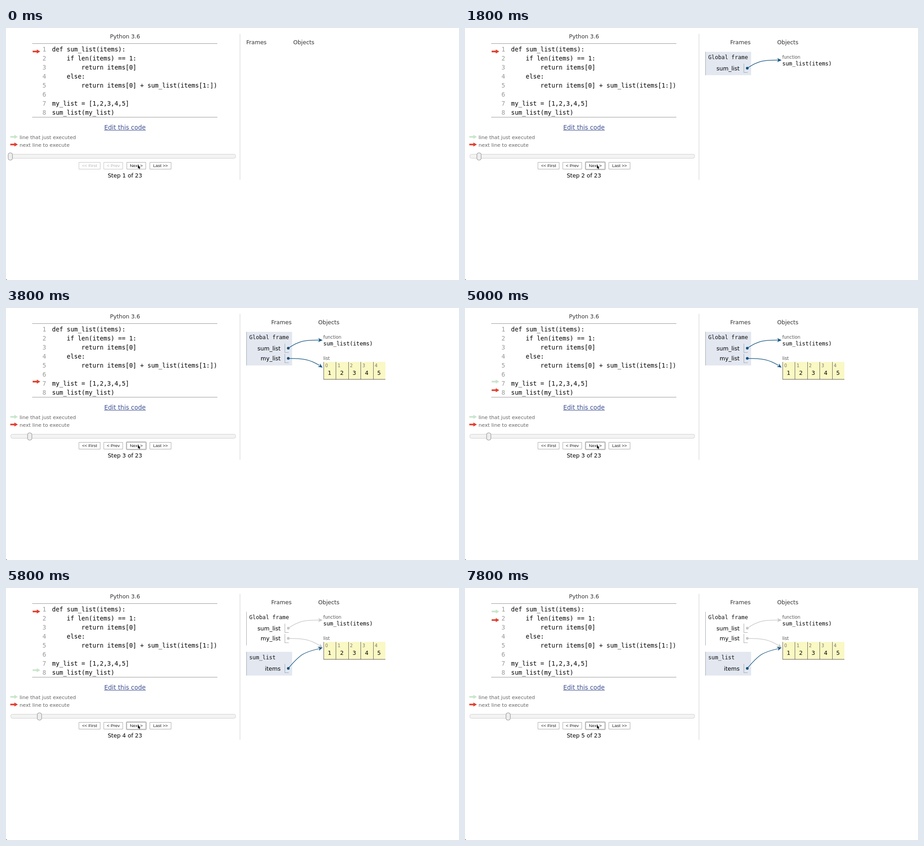
Recreate the animation shown at these times as an HTML page with a canvas. Size 1003 px wide and 558 px high, loop 8000 ms.

```html
<!DOCTYPE html>
<html lang="en">
<head>
<meta charset="utf-8">
<title>Recursive sum, step by step</title>
<style>
html, body { margin: 0; width: 100%; height: 100%; overflow: hidden; background: #fff; }
canvas { display: block; }
</style>
</head>
<body>
<canvas id="stage" width="1003" height="558"></canvas>
<script>
const ctx = document.getElementById('stage').getContext('2d');
const SANS = '"DejaVu Sans", sans-serif';
const MONO = '"DejaVu Sans Mono", monospace';
const ARIAL = '"Liberation Sans", sans-serif';
const LOOP = 8000, TICK = 200;
const RED = '#e0402f', GREEN = '#c8e5ca', BLUE = '#11527f', FADED = '#c6c6c6';

const CODE = [
  'def sum_list(items):',
  '    if len(items) == 1:',
  '        return items[0]',
  '    else:',
  '        return items[0] + sum_list(items[1:])',
  '',
  'my_list = [1,2,3,4,5]',
  'sum_list(my_list)'
];
const STEP_TIMES = [1800, 3800, 5400, 7400];
const PRESSES = [[1200, 1800], [3600, 3800], [7200, 7400]];
// Gutter pointer: start time, from y, to y
const MOVES = [[1942, 52, 163], [3870, 163, 182], [5506, 182, 52], [7385, 52, 71]];
const MOVE_MS = 250;

const ease = p => p < 0.5 ? 4 * p ** 3 : 1 - 4 * (1 - p) ** 3;

function text(str, x, y, size, font = SANS, color = '#111', align = 'left') {
  ctx.font = `${size}px ${font}`;
  ctx.fillStyle = color;
  ctx.textAlign = align;
  ctx.fillText(str, x, y);
}

function box(x, y, w, h, color) {
  ctx.fillStyle = color;
  ctx.fillRect(x, y, w, h);
}

function rounded(x, y, w, h, r, fill, stroke) {
  ctx.beginPath();
  ctx.roundRect(x, y, w, h, r);
  ctx.fillStyle = fill;
  ctx.fill();
  ctx.strokeStyle = stroke;
  ctx.lineWidth = 1;
  ctx.stroke();
}

function polygon(points, color) {
  ctx.beginPath();
  points.forEach(([x, y]) => ctx.lineTo(x, y));
  ctx.closePath();
  ctx.fillStyle = color;
  ctx.fill();
}

function marker(x, y, color) {
  polygon([[x, y - 1.8], [x + 9, y - 1.8], [x + 9, y - 4.6], [x + 16.8, y],
    [x + 9, y + 4.6], [x + 9, y + 1.8], [x, y + 1.8]], color);
}

function drawCode() {
  text('Python 3.6', 263.5, 22.5, 12.4, SANS, '#333', 'center');
  box(58, 34, 410, 1, '#999');
  box(58, 197, 410, 1, '#999');
  CODE.forEach((line, i) => {
    const y = 51.7 + i * 20;
    text(i + 1, 89, y, 13.5, MONO, '#999', 'right');
    text(line, 102, y, 13.5, MONO, '#000');
  });
  text('Edit this code', 217.5, 224.5, 13.5, SANS, '#3d4f91');
  box(217.5, 226, 92, 1, '#3d4f91');
  marker(9.5, 241, GREEN);
  marker(9.5, 258, RED);
  text('line that just executed', 30, 245.5, 11.15, SANS, '#666');
  text('next line to execute', 30, 262.5, 11.15, SANS, '#666');
  box(517.5, 13, 1.2, 323, '#d8d8d8');
  box(0, 557, 2, 1, '#333');
}

function drawPointers(t, step) {
  let y = 52;
  for (const [start, from, to] of MOVES) {
    if (t >= start) y = from + (to - from) * ease(Math.min(1, (t - start) / MOVE_MS));
  }
  if (step > 1) marker(59, MOVES[step - 2][1], GREEN);
  if (t >= 5400 && t < 5600) marker(59, 163, '#ebebeb');
  marker(59, y, RED);
}

function button(label, x, w, enabled = true) {
  rounded(x + 0.5, 297.5, w - 1, 15, 0, '#fff', enabled ? '#aaa' : '#c4c4c4');
  text(label, x + w / 2, 308.3, 9.8, ARIAL, enabled ? '#222' : '#b8b8b8', 'center');
}

function drawControls(t, step) {
  rounded(10.5, 279.5, 498, 9, 4, '#f3f3f3', '#d0d0d0');
  rounded(4.8 + (step - 1) * 21.5, 276.5, 9.5, 16, 4, '#eee', '#8a8a8a');
  const pressed = PRESSES.some(([a, b]) => t >= a && t < b);
  const started = step > 1;
  button('<< First', 161, 48, started);
  button('< Prev', 216, 43, started);
  if (started || pressed) rounded(266, 296, 45, 18, 2, '#c2c2c2', '#c2c2c2');
  button('Next >', 267, 43);
  if (pressed) {
    ctx.strokeStyle = '#777';
    ctx.strokeRect(267.5, 297.5, 42, 15);
  }
  button('Last >>', 318, 48);
  polygon([[292.3, 303.6], [292.3, 311.3], [294.1, 309.8], [295.3, 312.4],
    [296.7, 311.8], [295.6, 309.3], [297.8, 309.2]], '#000');
  text(`Step ${step} of 23`, 263.3, 331, 12.5, SANS, '#000', 'center');
}

function frameBox(title, y, h, active) {
  if (active) box(532, y, 101.5, h, '#e2e7f0');
  box(532, y, 1, h, '#a5a9b0');
  text(title, 538.5, y + 16.5, 12.2, MONO);
}

function variable(name, y) {
  text(name, 608, y + 4.6, 12.5, SANS, '#000', 'right');
  box(617, y - 10, 1, 20, '#a5a9b0');
  box(617, y + 9, 9, 1, '#a5a9b0');
}

// Reference line: start dot, cubic curve, arrowhead with folded back
function link(y, curve, tipX, tipY, angle, color) {
  ctx.beginPath();
  ctx.arc(625, y, 3, 0, Math.PI * 2);
  ctx.fillStyle = color;
  ctx.fill();
  ctx.beginPath();
  ctx.moveTo(625, y);
  ctx.bezierCurveTo(...curve);
  ctx.strokeStyle = color;
  ctx.lineWidth = 1.2;
  ctx.stroke();
  ctx.save();
  ctx.translate(tipX, tipY);
  ctx.rotate(angle);
  polygon([[0, 0], [-10, -4.5], [-7, 0], [-10, 4.5]], color);
  ctx.restore();
}

function drawList() {
  text('list', 702.5, 115, 9.75, SANS, '#555');
  box(703, 119.5, 137, 38.5, '#faf8c3');
  for (let i = 0; i < 5; i++) {
    const x = 703 + i * 27.4;
    box(Math.round(x), 119.5, 1, 38.5, '#666');
    text(i, x + 3.8, 131, 9.75, SANS, '#777');
    text(i + 1, x + 13.4, 147.8, 12.4, SANS, '#000', 'center');
  }
  box(703, 157.5, 137, 1, '#555');
}

function drawMemory(step) {
  const shift = step > 1 ? 55.3 : 0;
  text('Frames', 532 + shift, 35.8, 12.4, SANS, '#333');
  text('Objects', 636 + shift, 35.8, 12.4, SANS, '#333');
  if (step < 2) return;

  const called = step > 3;
  const tone = called ? FADED : BLUE;
  frameBox('Global frame', 52.7, step > 2 ? 74.5 : 51.8, !called);
  variable('sum_list', 89);
  text('function', 702.5, 67.8, 9.75, SANS, '#555');
  text('sum_list(items)', 702.5, 83, 12.15, MONO, '#000');
  if (step > 2) {
    variable('my_list', 111.6);
    drawList();
  }
  if (called) {
    frameBox('sum_list', 141.3, 52.5, true);
    variable('items', 178);
  }
  link(89, [650, 72, 662, 71, 694, 71.2], 701, 71.2, 0.03, tone);
  if (step > 2) link(111.6, [662, 111.6, 674, 115, 694, 127], 701, 132, 0.6, tone);
  if (called) link(178, [652, 146, 660, 142, 693, 134.5], 701, 132, -0.28, BLUE);
}

function draw(now) {
  const t = Math.floor(now % LOOP / TICK) * TICK;
  const step = 1 + STEP_TIMES.filter(s => t >= s).length;
  box(0, 0, 1003, 558, '#fff');
  drawCode();
  drawPointers(t, step);
  drawControls(t, step);
  drawMemory(step);
}

const begin = performance.now();
function loop() {
  draw(performance.now() - begin);
  requestAnimationFrame(loop);
}
loop();
</script>
</body>
</html>
```
